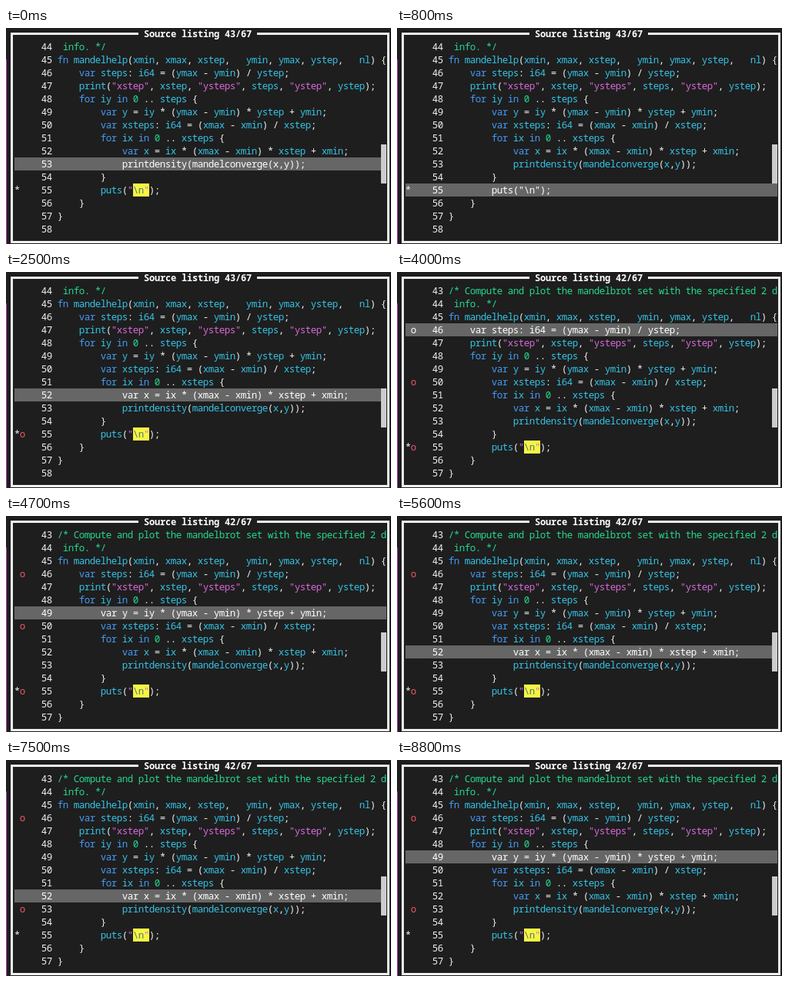
An HTML page with a canvas that plays this animation: 500 px wide and 282 px high, repeating every 8900 ms.

```html
<!DOCTYPE html>
<html lang="en">
<head>
<meta charset="utf-8">
<title>Source listing</title>
<style>
html, body { margin: 0; width: 100%; height: 100%; overflow: hidden; background: #1e1e1e; }
canvas { display: block; }
</style>
</head>
<body>
<canvas id="stage" width="500" height="282"></canvas>
<script>
const ctx = document.getElementById('stage').getContext('2d');
const LOOP = 8900, CELL = 7, ROW = 17, ROWS = 15;
const MIN_ROW = 3, MAX_ROW = 12; // the view scrolls to keep the cursor between these
const FONT = '12.5px "Noto Sans Mono", "DejaVu Sans Mono", monospace';
const TITLE_FONT = 'bold 12px "Noto Sans Mono", "DejaVu Sans Mono", monospace';
const C = {
  bg: '#1e1e1e', text: '#f0f0f0', frame: '#f0f0f0', cursor: '#666666', bar: '#cccccc',
  name: '#35c4e6', keyword: '#459bf5', number: '#23d98f', comment: '#23d98f',
  string: '#da68da', escape: '#56707a', escapeBg: '#f5f543', mark: '#f0566a', pane: '#bc3fbc'
};

const FIRST = 43;
const LINES = [
  '/* Compute and plot the mandelbrot set with the specified 2 d',
  ' info. */',
  'fn mandelhelp(xmin, xmax, xstep,   ymin, ymax, ystep,   nl) {',
  '    var steps: i64 = (ymax - ymin) / ystep;',
  '    print("xstep", xstep, "ysteps", steps, "ystep", ystep);',
  '    for iy in 0 .. steps {',
  '        var y = iy * (ymax - ymin) * ystep + ymin;',
  '        var xsteps: i64 = (xmax - xmin) / xstep;',
  '        for ix in 0 .. xsteps {',
  '            var x = ix * (xmax - xmin) * xstep + xmin;',
  '            printdensity(mandelconverge(x,y));',
  '        }',
  '        puts("\\n");',
  '    }',
  '}',
  ''
];

// Key presses: u = up, d = down, b = toggle breakpoint
const KEYS = [
  [400, 'd'], [800, 'd'], [1800, 'b'], [2100, 'u'], [2300, 'u'], [2400, 'u'],
  [2700, 'u'], [2900, 'u'], [3100, 'b'], [3400, 'u'], [3500, 'u'], [3600, 'u'],
  [3700, 'u'], [3900, 'b'], [4300, 'd'], [4500, 'd'], [4700, 'd'], [4800, 'd'],
  [5000, 'b'], [5300, 'd'], [5500, 'd'], [5700, 'd'], [5900, 'd'], [6000, 'd'],
  [6300, 'b'], [6600, 'u'], [6800, 'u'], [7000, 'b'], [7400, 'u'], [7900, 'u'],
  [8200, 'u'], [8500, 'u']
];

function stateAt(t) {
  const s = { top: 44, line: 53, breaks: new Set() };
  for (const [at, key] of KEYS) {
    if (at > t) break;
    if (key === 'b') {
      if (!s.breaks.delete(s.line)) s.breaks.add(s.line);
    } else {
      s.line += key === 'd' ? 1 : -1;
    }
    s.top = Math.min(s.top, s.line - MIN_ROW);
    s.top = Math.max(s.top, s.line - MAX_ROW);
  }
  return s;
}

const colX = col => 4 + col * CELL;
const rowY = row => 16 + row * ROW;

function box(x, y, w, h, color) {
  ctx.fillStyle = color;
  ctx.fillRect(x, y, w, h);
}

// Terminal text: one glyph centred in each cell
function put(text, col, row, color) {
  ctx.fillStyle = color;
  ctx.textAlign = 'center';
  for (let i = 0; i < text.length; i++) {
    if (text[i] !== ' ') ctx.fillText(text[i], colX(col + i + 0.5), rowY(row) + 13);
  }
}

function tokenColor(token) {
  if (token[0] === '"') return C.string;
  if (/^\d/.test(token)) return C.number;
  if (/^(fn|var|for|in)$/.test(token)) return C.keyword;
  return /^\w/.test(token) ? C.name : C.text;
}

function drawCode(n, row, selected) {
  const text = LINES[n - FIRST];
  if (selected) return put(text, 9, row, '#ffffff');
  if (n < 45) return put(text, 9, row, C.comment);
  for (const m of text.matchAll(/"[^"]*"|\w+|[^\s\w"]+/g)) {
    const col = 9 + m.index;
    if (m[0].includes('\\')) {
      box(colX(col + 1), rowY(row), 3 * CELL, ROW, C.escapeBg);
      put('"', col, row, C.string);
      put('\\n', col + 1, row, C.escape);
      put('"', col + 3, row, C.string);
    } else {
      put(m[0], col, row, tokenColor(m[0]));
    }
  }
}

function drawFrame(top) {
  box(0, 41, 1, 241, C.pane);
  box(6, 6, 166, 3, C.frame);
  box(326, 6, 172, 3, C.frame);
  box(6, 6, 3, 275, C.frame);
  box(495, 6, 3, 275, C.frame);
  box(6, 278, 492, 3, C.frame);
  box(colX(69), rowY(8), CELL, 3 * ROW, C.bar);
  ctx.font = TITLE_FONT;
  put('Source listing ' + (top - 1) + '/67', 25, -1, '#ffffff');
}

function draw(t) {
  const s = stateAt(t);
  box(0, 0, 500, 282, C.bg);
  ctx.font = FONT;
  for (let row = 0; row < ROWS; row++) {
    const n = s.top + row, selected = n === s.line;
    if (selected) box(colX(1), rowY(row), 69 * CELL, ROW, C.cursor);
    if (n === 55) put('*', 1, row, C.text);
    if (s.breaks.has(n)) put('o', 2, row, selected ? '#ffffff' : C.mark);
    put(String(n), 6, row, selected ? '#ffffff' : C.text);
    drawCode(n, row, selected);
  }
  drawFrame(s.top);
}

const start = performance.now();
function tick() {
  draw((performance.now() - start) % LOOP);
  requestAnimationFrame(tick);
}
tick();
</script>
</body>
</html>
```
